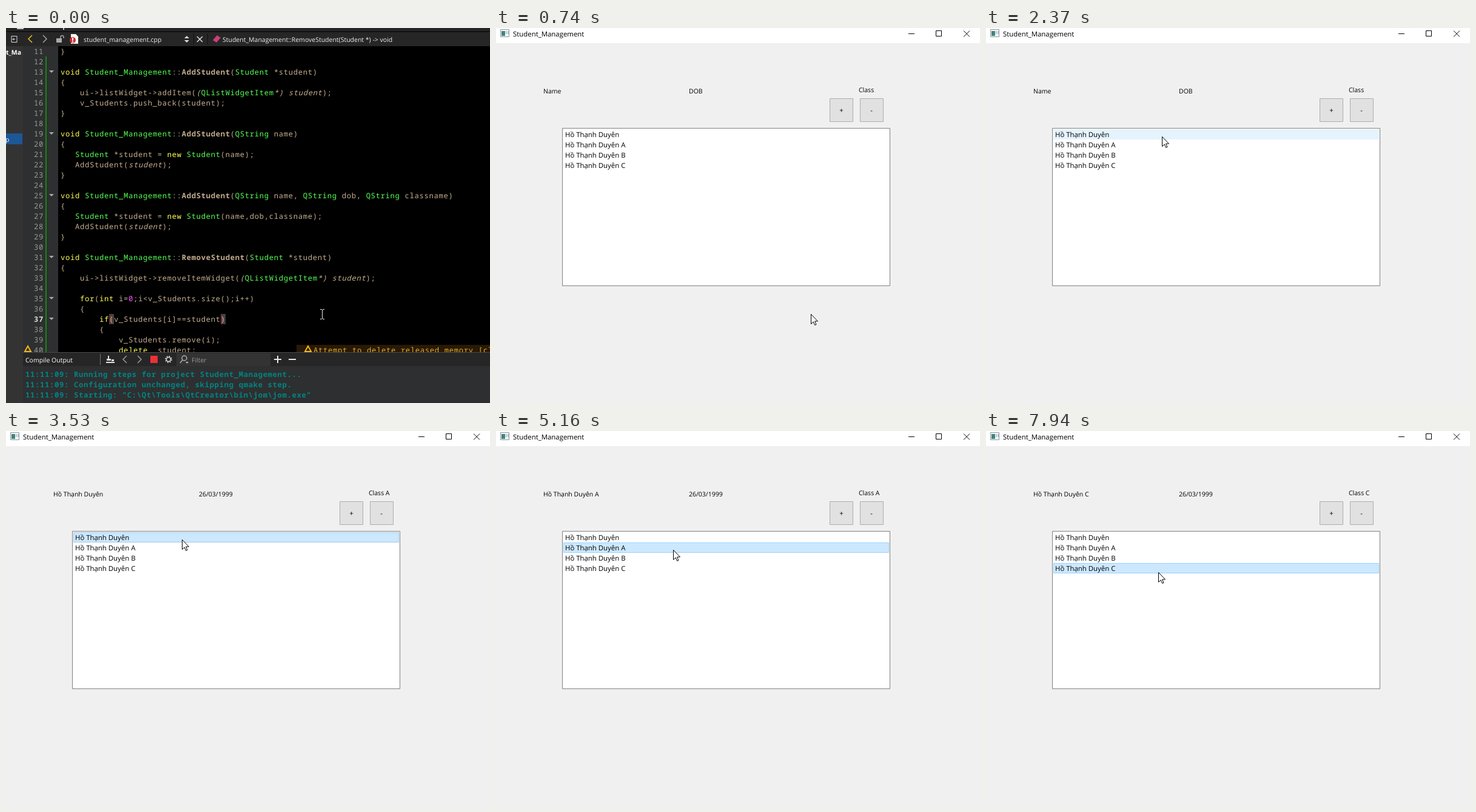
Write an HTML page that moves like this. It is 798x619 px and loops after 8000 ms.

```html
<!DOCTYPE html>
<html lang="en">
<head>
<meta charset="utf-8">
<title>Student_Management</title>
<style>
html, body { margin: 0; width: 100%; height: 100%; overflow: hidden; background: #000; }
svg { display: block; width: 798px; height: 619px; }
text { white-space: pre; text-rendering: geometricPrecision; }
.ui { font: 11.4px "Open Sans", "Noto Sans", sans-serif; }
.small { font-size: 10.5px; }
.mono { font: 12.2px "Noto Sans Mono", "DejaVu Sans Mono", monospace; letter-spacing: .68px; fill: #c4ae90; }
.bold { font-weight: bold; }
.it { font-style: italic; }
.key { fill: #ffff55; }
.type { fill: #55ff55; }
.num { fill: #ff55ff; }
.log { fill: #008585; font-weight: bold; }
.line { fill: none; stroke: #dcdcdc; stroke-width: 1.5; }
</style>
</head>
<body>
<svg viewBox="0 0 798 619">
  <g id="ide">
    <path fill="#333" d="M0 0H798V619H0z"/>
    <path fill="#262626" d="M0 0H798V30H0z"/>
    <path fill="#111" d="M0 5H798V7H0z"/>
    <path fill="#c8c8c8" d="M18 0h11v2h-11zM94 0h2v3h-2z"/>
    <path fill="#2e2f30" d="M28 30H86V535H28z"/>
    <path d="M86 30H798V535H86z"/>
    <path fill="#1d5797" d="M0 174H27V192H0z"/>
    <svg width="28" height="619" class="ui small" fill="#fff">
      <text x="0" y="44" class="bold">t_Ma</text>
      <text x="-1" y="188">p</text>
    </svg>
    <path class="line" d="M9 13.500h9v10H9zM15 18.500h-4m2-2l-2 2 2 2" style="stroke-width:1"/>
    <path class="line" d="M43 12l-6 6 6 6" style="stroke:#e8c220"/>
    <path class="line" d="M61 12l6 6-6 6M90 18v-3a2.500 2.500 0 0 1 5 0v2" style="stroke:#a0a0a0"/>
    <path fill="#aaa" d="M83 17h9v7h-9z"/>
    <path fill="#f4f4f4" d="M107 10h8l4 4v12h-12z"/>
    <circle cx="110" cy="20" r="5" fill="#d82c2c"/>
    <path fill="#fff" d="M109 16h2v5h-2zM109 22h2v2h-2z"/>
    <path fill="#ddd" d="M294 17l4-4 4 4zM294 20l4 4 4-4z"/>
    <path class="line" d="M315 14l9 9m0-9l-9 9"/>
    <path fill="#111" d="M309 9h1v18h-1zM332 9h1v18h-1z"/>
    <path fill="#c84078" d="M341 20l7-8 6 4-7 8z"/>
    <g class="ui small" fill="#f0f0f0">
      <text x="128" y="23">student_management.cpp</text>
      <text x="357" y="23">Student_Management::RemoveStudent(Student *) -&gt; void</text>
    </g>
    <path fill="#128a12" d="M65 47h2V535h-2z"/>
    <path fill="#484040" d="M170 472h8v17h-8zM354 472h8v17h-8z"/>
    <path fill="#291905" d="M479 523H798V535H479z"/>
    <svg id="code" class="mono" width="798" height="535"></svg>
    <path id="caret" fill="#ddd" d="M362 472h2v17h-2z"/>
    <path d="M518 464.500h2l1.500 1 1.500-1h2M521.500 465.500v14M518 480.500h2l1.500-1 1.500 1h2" fill="none" stroke="#eee"/>

    <path fill="#262626" d="M28 536H798V558H28z"/>
    <path fill="#333" d="M281 537H436V558H281z"/>
    <path fill="#484848" d="M28 535H798v1H28z"/>
    <path fill="#777" d="M155 538h1v18h-1z"/>
    <path fill="#2e2f30" d="M28 558H798V619H28z"/>
    <path fill="#e0e0e0" d="M168 541h2v5h3v3h-7v-3h2zM165 551h14v2h-14zM174 547h4v3h-4z"/>
    <path class="line" d="M199 541l-6 6 6 6M217 541l6 6-6 6" style="stroke:#999"/>
    <path id="stop" d="M238 541h12v12h-12z"/>
    <circle cx="268" cy="547" r="3.500" class="line"/>
    <circle cx="268" cy="547" r="5.200" class="line" stroke-dasharray="2 2.080"/>
    <path class="line" d="M291 548l-4 5M298 545a4 4 0 1 1-8 0 4 4 0 1 1 8 0" style="stroke:#b0b0b0"/>
    <path fill="#bbb" d="M296 551h5l-2.500 3z"/>
    <path fill="#e8e8e8" d="M442 546h12v2h-12zM447 541h2v12h-2zM466 546h12v2h-12z"/>
    <g class="ui small">
      <text x="32" y="552" fill="#fff">Compile Output</text>
      <text x="306" y="552" fill="#999">Filter</text>
    </g>
    <g id="log" class="mono"></g>
  </g>

  <g id="app">
    <path fill="#f0f0f0" d="M0 0H798V619H0z"/>
    <path fill="#fff" d="M0 0H798V25H0z"/>
    <path fill="#f8f8f8" stroke="#8a949c" d="M7.500 2.500h14v12h-14z"/>
    <path fill="#3f8580" d="M9 5h6v8H9z"/>
    <path fill="#b8c8d0" d="M16 5h2v5h-2zM19 5h2v5h-2z"/>
    <path fill="none" stroke="#000" d="M680 9.500h10M725.500 4.500h9v9h-9zM771 4.500l10 10m0-10l-10 10"/>
    <path fill="#e1e1e1" stroke="#adadad" d="M550.500 116.500h38v38h-38zM600.500 116.500h38v38h-38z"/>
    <path fill="#fff" stroke="#828282" d="M109.500 165.500h540v260h-540z"/>
    <g id="rows"></g>
    <g class="ui">
      <text x="28" y="14">Student_Management</text>
      <g id="names"></g>
      <g text-anchor="middle"><text x="569.500" y="140">+</text><text x="619" y="140">-</text></g>
      <g class="small">
        <text id="name" x="78" y="108"></text>
        <text id="dob" x="318" y="108"></text>
        <text id="class" x="598" y="106"></text>
      </g>
    </g>
    <path id="arrow" fill="#fff" stroke="#000" d="M.5.5V16.500L4.200 13 6.700 18.500 9 17.500 6.600 12H11.500z"/>
  </g>
</svg>
<script>
const $ = id => document.getElementById(id);
const escape = s => s.replace(/&/g, '&amp;').replace(/</g, '&lt;');

// Text between ~ marks is italic.
const code = String.raw`}

void Student_Management::AddStudent(Student *student)
{
    ui->listWidget->addItem(~(~QListWidgetItem~*) student~);
    v_Students.push_back(student);
}

void Student_Management::AddStudent(QString name)
{
   Student *student = new Student(name);
   AddStudent(~student~);
}

void Student_Management::AddStudent(QString name, QString dob, QString classname)
{
   Student *student = new Student(name,dob,classname);
   AddStudent(~student~);
}

void Student_Management::RemoveStudent(Student *student)
{
    ui->listWidget->removeItemWidget(~(~QListWidgetItem~*) student~);

    for(int i=0;i<v_Students.size();i++)
    {
        if(v_Students[i]==student)
        {
            v_Students.remove(i);
            delete  student;`.split('\n');

const syntax = /~([^~]+)~|(?<=::)(\w+)|\b(void|new|for|int|if|delete)\b|\b(Student_Management|Student|QString|QListWidgetItem)\b|\b(\d)\b/g;
const styles = ['it', 'bold', 'key', 'type', 'num'];
const paint = line => escape(line).replace(syntax, (all, ...groups) => {
  const i = groups.slice(0, 5).findIndex(g => g !== undefined);
  return `<tspan class="${styles[i]}">${groups[i]}</tspan>`;
});
const warning = (x, y) =>
  `<path d="M${x} ${y}l5-9 5 9z" fill="none" stroke="#f0b818" stroke-width="2"/>`;

$('code').innerHTML = code.map((line, i) => {
  const n = i + 11, y = 43 + 17 * i;
  const number = `<text x="46" y="${y}" class="${n == 37 ? 'bold' : ''}" fill="${n == 37 ? '#ddd' : '#999'}">${n}</text>`;
  const fold = /^void|^ *(for|if)/.test(line)
    ? `<path fill="#aaa" d="M71 ${y - 7}h8l-4 4z"/>` : '';
  return number + fold + `<text x="90" y="${y}">${paint(line)}</text>`;
}).join('') + warning(31, 534) + warning(493, 534) +
  '<text x="507" y="536" fill="#e0b030">Attempt to delete released memory [clang</text>' +
  '<g fill="#ff7070"><text x="170" y="485">(</text><text x="354" y="485">)</text></g>';

const jom = String.raw`"C:\Qt\Tools\QtCreator\bin\jom\jom.exe"`;
const log = [
  'Running steps for project Student_Management...',
  'Configuration unchanged, skipping qmake step.',
  `Starting: ${jom}`,
  `The process ${jom} exited normally.`,
  'Elapsed time: 00:01.'
];

const person = 'Hồ Thạnh Duyên';
const people = ['', ' A', ' B', ' C'].map(s => person + s);
$('names').innerHTML = people.map((p, i) =>
  `<text x="114" y="${180 + 17 * i}">${p}</text>`).join('');

// [time, value] steps; each holds until the next.
const at = (steps, t) => steps.filter(s => s[0] <= t).pop();
const pointer = [
  [0, 519, 472], [1610, 429, 395], [1770, 281, 185], [1920, 282, 185],
  [2070, 283, 181], [2220, 289, 179], [2370, 290, 179], [3970, 294, 182],
  [4120, 297, 185], [4730, 292, 196], [5800, 293, 203], [5920, 294, 209],
  [6070, 290, 211], [6220, 285, 211], [7080, 292, 219], [7230, 294, 224],
  [7510, 284, 233]
];
const picked = [[0, -1], [2810, 0], [5160, 1], [6540, 2], [7790, 3]];
const shown = [[0, -1], [3530, 0], [5160, 1], [6540, 2], [7940, 3]];

function drawRows(hover, pick) {
  $('rows').innerHTML = people.map((p, i) => {
    const y = 167 + 17 * i;
    if (i != pick) return i == hover ? `<path fill="#e5f3ff" d="M111 ${y}h537v17h-537z"/>` : '';
    const edge = i != hover ? '#cce8ff' : i % 2 ? '#99d1ff' : '#a8c8e0';
    return `<path fill="#cce8ff" stroke="${edge}" d="M111.500 ${y + .5}h536v16h-536z"/>`;
  }).join('');
}

function drawLog(first) {
  $('log').innerHTML = log.slice(first, first + 3).map((line, i) =>
    `<text class="log" x="32" y="${576 + 17 * i}">${escape('11:11:09: ' + line)}</text>`).join('');
}

const start = performance.now();

function frame() {
  const t = (performance.now() - start) % 8000, open = t >= 740;
  $('app').style.display = open ? '' : 'none';
  $('ide').style.display = open ? 'none' : '';
  if (open) {
    const [, x, y] = at(pointer, t), who = at(shown, t)[1];
    $('arrow').setAttribute('transform', `translate(${x} ${y})`);
    drawRows(Math.floor((y - 167) / 17), at(picked, t)[1]);
    $('name').textContent = people[who] ?? 'Name';
    $('dob').textContent = who < 0 ? 'DOB' : '26/03/1999';
    $('class').textContent = 'Class' + (who < 0 ? '' : ' ' + 'AABC'[who]);
  } else {
    const done = t >= 120;
    drawLog(done ? 2 : 0);
    $('stop').setAttribute('fill', done ? '#666' : '#ec3038');
    $('caret').style.display = t >= 370 ? '' : 'none';
  }
  requestAnimationFrame(frame);
}
frame();
</script>
</body>
</html>
```
